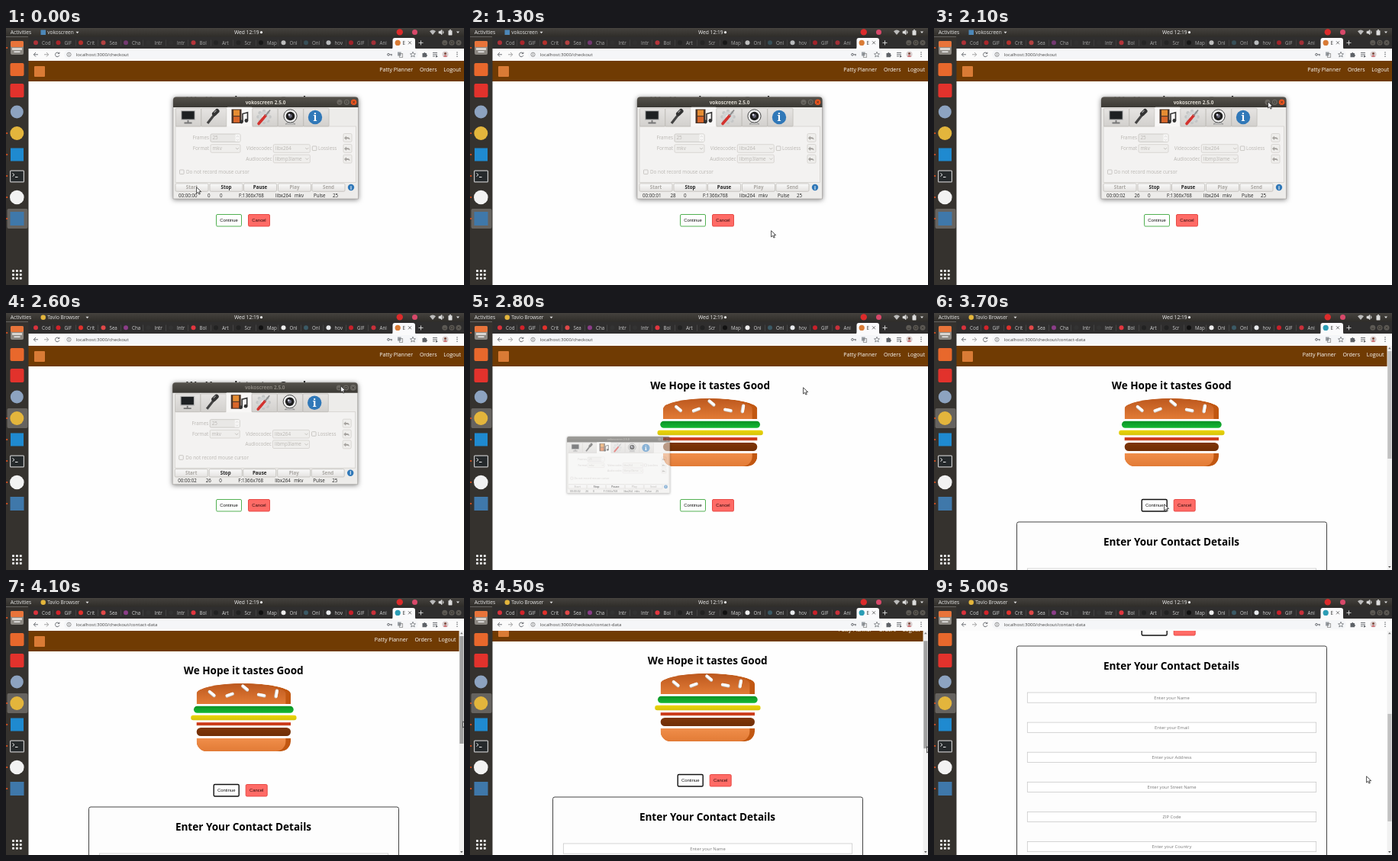
An HTML page for the animation above (5.1 s loop, 600 px wide and 337 px high).

```html
<!DOCTYPE html>
<html lang="en">
<head>
<meta charset="utf-8">
<title>Checkout screencast</title>
<style>
html, body { margin: 0; width: 100%; height: 100%; overflow: hidden; background: #fff; }
svg { display: block; width: 100vw; height: 100vh; font-family: "Open Sans", "Noto Sans", sans-serif; }
.shadow { filter: drop-shadow(0 1px 3px rgba(0, 0, 0, .5)); }
</style>
</head>
<body>
<svg id="stage" viewBox="0 0 600 337"></svg>
<script>
const LOOP = 5100, STEP = 100;
const MINIMIZE = 2600, SUBMIT = 3600;

const rect = (x, y, w, h, fill, more = '') =>
  `<rect x="${x}" y="${y}" width="${w}" height="${h}" fill="${fill}" ${more}/>`;
const circle = (x, y, r, fill, more = '') =>
  `<circle cx="${x}" cy="${y}" r="${r}" fill="${fill}" ${more}/>`;
const path = (d, stroke, width = 1, fill = 'none', more = '') =>
  `<path d="${d}" stroke="${stroke}" stroke-width="${width}" fill="${fill}" ${more}/>`;
const text = (x, y, size, fill, str, more = '') =>
  `<text x="${x}" y="${y}" font-size="${size}" fill="${fill}" ${more}>${str}</text>`;
const group = (id, body, more = '') => `<g id="${id}" ${more}>${body}</g>`;
const gradient = (id, a, b) =>
  `<linearGradient id="${id}" x2="0" y2="1"><stop stop-color="${a}"/><stop offset="1" stop-color="${b}"/></linearGradient>`;
const MID = 'text-anchor="middle"', END = 'text-anchor="end"', BOLD = 'font-weight="700"';
const ARIAL = 'font-family="Liberation Sans, Arial, sans-serif"';

const TOP_BUN = 'M253 139V125.5A61.5 13.5 0 0 1 376.3 125.5V139Z';
const LOW_BUN = 'M253 184H376.3V188A13 13 0 0 1 363.3 201H266A13 13 0 0 1 253 188Z';

const defs = `<defs>
  ${gradient('bunTop', '#bc581e', '#e27b36')}${gradient('bunLow', '#f08e4a', '#e27b36')}
  ${gradient('salad', '#0c9226', '#15b834')}${gradient('cheese', '#ecd404', '#d6c40c')}
  ${gradient('bacon', '#cb2c0e', '#cc4a24')}${gradient('meat', '#7f3608', '#702e05')}
  ${gradient('tab', '#e6e4e2', '#d2d0cd')}${gradient('key', '#fafafa', '#e4e2e0')}
  ${gradient('panel', '#45423e', '#2f2d29')}${gradient('caption-bar', '#55524c', '#3b3934')}
  <clipPath id="page"><rect x="29" y="43" width="571" height="294"/></clipPath>
  <clipPath id="topClip"><path d="${TOP_BUN}"/></clipPath>
  <clipPath id="lowClip"><path d="${LOW_BUN}"/></clipPath>
</defs>`;

function bun(d, fill, clip) {
  return `<g clip-path="url(#${clip})">${path(d, 'none', 0, '#c15711')}` +
    path(d, 'none', 0, `url(#${fill})`, 'transform="translate(-6.6 0)"') + '</g>';
}

function burger() {
  const seeds = [[273, 125.5, 40], [296.5, 127, -20], [316.5, 118, 40], [338, 127.5, 10], [357.5, 125.5, 100]];
  return bun(TOP_BUN, 'bunTop', 'topClip') +
    seeds.map(([x, y, a]) => `<g transform="translate(${x} ${y}) rotate(${a})">` +
      rect(-6, -2.1, 12, 4.4, '#c9c9c9', 'rx="2.2"') + rect(-5.7, -2, 11, 3.3, '#fff', 'rx="1.7"') + '</g>').join('') +
    rect(249.3, 141.8, 130.7, 9, 'url(#salad)', 'rx="4.5"') +
    rect(245.5, 153.8, 138.4, 6.4, 'url(#cheese)', 'rx="3.2"') +
    rect(253, 163.2, 123.3, 4, 'url(#bacon)') +
    rect(253, 170, 123.3, 11, 'url(#meat)', 'rx="5.5"') +
    bun(LOW_BUN, 'bunLow', 'lowClip');
}

function button(id, x, w, label) {
  return group(id, rect(x, 244.5, w, 15.5, '#fff', 'rx="1.5"') +
    text(x + w / 2, 254.2, 5.9, '#111', label, `${MID} ${ARIAL}`));
}

function form() {
  const fields = ['Name', 'Email', 'Address', 'Street Name', 'ZIP Code', 'Country'];
  return rect(108.9, 274.9, 406, 300, '#bbb', 'rx="3"') +
    rect(108.5, 274, 406, 300, '#fdfdfd', 'rx="2.5" stroke="#444" stroke-width="1"') +
    text(311, 304.8, 13.55, '#000', 'Enter Your Contact Details', `${MID} ${BOLD}`) +
    fields.map((f, i) => {
      const y = 335 + i * 39.1;
      return rect(122.3, y, 378.4, 13.2, '#fff', 'stroke="#c4c4c4" stroke-width=".7"') +
        text(311.5, y + 8.6, 5.85, '#777', f === 'ZIP Code' ? f : 'Enter your ' + f, MID);
    }).join('');
}

function page() {
  const links = [[533, 'Patty Planner'], [564.5, 'Orders'], [596, 'Logout']];
  return `<g clip-path="url(#page)">` + rect(29, 42, 571, 295, '#fefefe') +
    group('scroll',
      rect(29, 42, 571, 28, '#703b03') + rect(37, 50, 14, 14, '#d97b35', 'rx="1"') +
      group('links', links.map(([x, s]) => text(x, 57, 7, '#fff', s, END)).join('')) +
      group('order', text(314.6, 99.8, 13.55, '#000', 'We Hope it tastes Good', `${MID} ${BOLD}`) +
        burger() + button('ok', 275.5, 33, 'Continue') + button('cancel', 317.5, 28, 'Cancel')) +
      group('form', form())) +
    group('bar', rect(593.5, 42, 6.5, 295, '#f1f1f1') +
      path('M595 47.3L596.8 45L598.6 47.3Z', 'none', 0, '#777') +
      path('M595 332L596.8 334.3L598.6 332Z', 'none', 0, '#555') +
      rect(594.3, 50, 5.2, 141, '#c1c1c1', 'id="thumb"')) + '</g>';
}

function browser() {
  const tabs = [['Cod', '#d8323c'], ['GIF', '#d2232a'], ['Crit', '#e0312c'], ['Sea', '#e04848'], ['Cha', '#8b3d88'],
    ['Intr', '#333'], ['Intr', '#333'], ['Bol', '#e2363f'], ['Art', '#222'], ['Scr', '#222'], ['Map', '#111'],
    ['Onl', '#eee'], ['Onl', '#3b5a66'], ['hov', '#e8eaed'], ['GIF', '#c8202a'], ['Ani', '#c8303a']];
  const line = (d) => path(d, '#5f6368', .9);
  return rect(29, 11, 571, 17, '#2f2e2e') +
    group('tabText', tabs.map(([s, c], i) => {
      const x = 39 + i * 29.5;
      return circle(x, 19.2, 3, c) + text(x + 8, 21.5, 6.2, '#d0d0d0', s) +
        (i ? rect(x - 7, 15.5, .5, 8, '#5a5a5a') : '');
    }).join('')) +
    path('M504 28Q506.5 28 506.5 25V16Q506.5 13 509.5 13H533Q536 13 536 16V25Q536 28 538.5 28Z', 'none', 0, '#fafafb') +
    circle(513.2, 19.4, 3.6, '#d97b35', 'id="favicon"') +
    text(519.5, 21.6, 6.2, '#333', 'E') + path('M527 17.3L531 21.3M531 17.3L527 21.3', '#555', .8) +
    path('M540.5 19.4H546.5M543.5 16.4V22.4', '#ddd', .9) +
    [574.8, 584, 593].map(x => circle(x, 19.2, 3.5, '#5d5a55')).join('') +
    path('M573.2 20.2H576.4M582.5 17.8H585.5V20.7H582.5ZM591.6 17.8L594.4 20.6M594.4 17.8L591.6 20.6', '#2e2b28', .7) +
    rect(29, 27, 571, 16, '#fbfbfb') + rect(76, 28.7, 464, 12, '#f5f6f8', 'rx="6"') +
    line('M42 34.8H36.5M39 32L36.3 34.8L39 37.6') +
    path('M50 34.8H55.5M53 32L55.7 34.8L53 37.6', '#999', .9) +
    line('M69.3 33A2.8 2.8 0 1 0 69.9 35.8M69.9 31.7V33.6H67.8') +
    circle(82.5, 34.8, 2.6, 'none', 'stroke="#666" stroke-width=".7"') + path('M82.5 34.3V36.3M82.5 33V33.7', '#666', .7) +
    text(91.8, 37, 6.1, '#444', '', 'id="url"') +
    circle(501, 34.8, 1.4, 'none', 'stroke="#5f6368" stroke-width=".9"') + line('M502.4 34.8H506M505 34.8V36.5') +
    rect(513, 31.5, 4.6, 5, '#9aa0a6') + rect(515.3, 33.7, 4.4, 4.6, 'none', 'stroke="#777" stroke-width=".7"') +
    path('M533 31.3L534 33.7L536.5 33.9L534.6 35.5L535.2 38L533 36.6L530.8 38L531.4 35.5L529.5 33.9L532 33.7Z', '#5f6368', .7) +
    path('M545.5 33H547.3A1 1 0 0 1 549.3 33H551V35A1 1 0 0 1 551 37V38.3H545.5Z', 'none', 0, '#5f6368') +
    line('M559 32.5H565M559 34.8H565M559 37H562') + path('M563 35.6L566 37.2L563 38.8Z', 'none', 0, '#5f6368') +
    circle(575.5, 34.6, 4, '#d9cfd0') + circle(575.5, 33.4, 1.5, '#7a4a3c') + path('M572.8 37.5Q575.5 33.8 578.2 37.5Z', 'none', 0, '#c9474c') +
    [32, 34.6, 37.2].map(y => circle(591, y, .75, '#5f6368')).join('');
}

function desktop() {
  const grid = [0, 1, 2].flatMap(i => [0, 1, 2].map(j => rect(8 + i * 4.9, 317 + j * 4.9, 3, 3, '#e8e8e8', 'rx=".8"')));
  return rect(0, 0, 600, 11.5, 'url(#panel)') +
    text(5.8, 8.2, 6.7, '#e6e6e6', 'Activities') +
    rect(45.5, 2.5, 6.5, 6.5, '#4d87b8', 'id="appIcon"') + text(54.3, 8.2, 6.5, '#e6e6e6', '', 'id="appName"') +
    path('M0 0H4L2 2.4Z', 'none', 0, '#ddd', 'id="appCaret"') +
    text(315.3, 8.2, 6.7, '#f0f0f0', 'Wed 12:19', MID) + circle(334.5, 5.7, 1.6, '#eee') +
    circle(515.8, 5.4, 4.2, '#dc2b2b') + circle(535.5, 5.4, 3.5, '#d8486a') +
    path('M555 4.2Q559 1 563 4.2L559 9Z', 'none', 0, '#bbb') +
    path('M567 4.3H569L571 2.4V8.8L569 7H567ZM572.3 3.6Q574 5.6 572.3 7.6', '#ddd', .7, '#ddd') +
    rect(579.5, 3.2, 5, 6.2, '#ddd', 'rx=".6"') + rect(581, 2.1, 2, 1.2, '#ddd') +
    path('M590 4.5H594L592 7Z', 'none', 0, '#ddd') +
    rect(0, 11.5, 29.5, 326, '#35322e') +
    rect(1.5, 237, 27, 26, '#66635f', 'rx="2" id="active"') +
    // dock icons
    rect(6, 17, 17, 18, '#8c8882', 'rx="2"') + rect(6, 17, 17, 8, '#e8743a', 'rx="2"') + rect(8, 26, 13, 3, '#d8d5d0') +
    rect(10.5, 30.5, 8, 1.5, '#eee') +
    rect(5.5, 46, 18, 17, '#e8682c', 'rx="2"') + rect(5.5, 73, 18, 18, '#e2322c', 'rx="2"') +
    circle(14.3, 110, 8.5, '#8da3c0') + circle(14.3, 138, 9, '#e3b53c') + rect(6, 157.5, 17, 17, '#1f8ad0') +
    rect(5, 186.5, 19, 16, '#c8c8c8', 'rx="1.5"') + rect(6.2, 187.7, 16.6, 13.6, '#25292b') +
    path('M8.5 190.5L11 192.5L8.5 194.5M12 195.5H15.5', '#fff', .9) +
    circle(14.3, 222, 9.3, '#f2f2f2') + rect(5.5, 241, 18, 18, '#3f78aa') +
    [26, 138, 166, 194, 222, 250].map(y => circle(1.2, y, 1.1, '#e95420')).join('') + grid.join('');
}

function recorderIcons() {
  const teeth = Array.from({ length: 8 }, (_, i) => {
    const a = i * Math.PI / 4;
    return circle(338 + 7.6 * Math.cos(a), 116.5 + 7.6 * Math.sin(a), 2.2, '#c4c6c6');
  });
  return rect(229, 108, 19, 13, '#bbb', 'rx="1"') + rect(230.3, 109.2, 16.4, 10.4, '#1d2022') +
    path('M233.5 124.5H243.5M238.5 121V124', '#777', 1.8) +
    path('M264 125L273 113.5', '#444', 3.2) + path('M273 112.5L276.5 109', '#333', 6, 'none', 'stroke-linecap="round"') +
    path('M272.5 111L275.5 108', '#999', 1.2) +
    rect(295.5, 106.5, 13, 18.5, '#4a3428') + rect(298, 107.5, 8, 7.6, '#e58c32') + rect(298, 116.2, 8, 7.6, '#d9662a') +
    path('M310 123V112.5L316.5 110.8V121.3', '#333', 1.6) + circle(308.4, 123, 2.4, '#333') + circle(314.9, 121.5, 2.4, '#333') +
    teeth.join('') + circle(338, 116.5, 7, '#d2d4d4') + circle(338, 116.5, 2.6, '#f2f2f2') +
    path('M331 125.5L340 115', '#d3322e', 3.6, 'none', 'stroke-linecap="round"') + path('M340 115L346 107.5', '#8a8a8a', 1.8) +
    path('M366 126Q372.5 121 379 126Z', '#777', .6, '#ddd') +
    circle(372.5, 115.5, 8.6, '#f0f0f0', 'stroke="#444" stroke-width="1"') + circle(372.5, 115.5, 5.8, '#1e1e1e') +
    circle(372.5, 115.5, 2.4, '#667') + circle(371, 113.8, 1.3, '#dde') +
    circle(405, 117, 9.2, '#3078b8') + text(405, 122, 14, '#fff', 'i', `${MID} ${BOLD} font-family="Noto Serif, serif"`);
}

function recorder() {
  const gray = '#b9b6b2', edge = 'stroke="#cfccc8" stroke-width=".7"';
  const label = (x, y, s, more = '') => text(x, y, 6.3, gray, s, more);
  const combo = (x, y, w, s) => rect(x, y, w, 10.6, '#efeeec', `rx="1.5" ${edge}`) + label(x + 2.5, y + 7.5, s) +
    path(`M${x + w - 6} ${y + 4.4}l2 2l2-2`, gray, .8);
  const check = (x, y) => rect(x, y, 5.6, 5.6, '#f2f1f0', `rx=".8" stroke="${gray}" stroke-width=".7"`);
  const reset = (y) => rect(442, y, 11, 10.8, '#efeeec', `rx="1.5" ${edge}`) +
    path(`M450.5 ${y + 8}q0-3.2-3-3.2h-1.5v-1.8l-3 2.8l3 2.8v-1.8h1.5q1.5 0 3 1.2`, 'none', 0, '#a5a29e');
  const keys = [[222, 'Start'], [267, 'Stop', 1], [311.5, 'Pause', 1], [356.5, 'Play'], [401, 'Send']];
  const status = [[226, '', 'clock'], [262.5, '', 'fps'], [280, '0'], [305, 'F:1366x768'], [353, 'libx264'],
    [378, 'mkv'], [403, 'Pulse'], [428, '25']];
  return path('M219 224V94.5Q219 90.5 223 90.5H457.5Q461.5 90.5 461.5 94.5V224Z', '#9b9894', .6, '#edecea', 'class="shadow"') +
    path('M219 104V94.5Q219 90.5 223 90.5H457.5Q461.5 90.5 461.5 94.5V104Z', 'none', 0, 'url(#caption-bar)') +
    text(340, 99.7, 6.4, '#dfdbd2', 'vokoscreen 2.5.0', `${MID} ${BOLD} id="caption"`) +
    circle(437, 97.2, 3.5, '#6b6862') + circle(446.3, 97.2, 3.5, '#6b6862') + circle(455.6, 97.2, 3.8, '#e9541f', 'id="close"') +
    path('M435.4 98.2H438.6M444.8 95.8H447.8V98.7H444.8ZM454.2 95.8L457 98.6M457 95.8L454.2 98.6', '#2e2b28', .7) +
    rect(222, 129, 236.5, 73.5, '#f3f2f1', edge) +
    [0, 1, 2, 3, 4, 5].map(i => rect(222.3 + i * 33.5, i === 2 ? 103.7 : 105.3, 33.3, i === 2 ? 26 : 23.7,
      i === 2 ? '#f8f7f6' : 'url(#tab)', `rx="1" ${i === 2 ? '' : 'stroke="#b5b2ae" stroke-width=".6"'}`)).join('') +
    recorderIcons() +
    label(266, 146.4, 'Frames', END) + rect(268, 139, 39, 10.4, '#e9e8e6', 'rx="1.5" stroke="#c0bdb9" stroke-width=".7"') +
    label(270.5, 146.4, '25') + rect(300.5, 139.4, 6, 9.6, '#f6f5f4') + path('M302 143l1.5-1.5l1.5 1.5M302 146l1.5 1.5l1.5-1.5', '#ccc', .6) +
    label(266, 160.3, 'Format', END) + combo(268, 152.7, 39, 'mkv') +
    label(348.5, 160.3, 'Videocodec', END) + combo(350.3, 152.7, 48, 'libx264') + check(401.3, 155) + label(409, 160.3, 'Lossless') +
    label(348.5, 173.8, 'Audiocodec', END) + combo(350.3, 166.2, 48, 'libmp3lame') +
    [138.5, 152.5, 166.3].map(reset).join('') + check(227.5, 186) + label(236, 191.3, 'Do not record mouse cursor') +
    keys.map(([x, s, on]) => rect(x, 204, 43, 10.3, 'url(#key)', 'rx="1.5" stroke="#bbb8b4" stroke-width=".7"') +
      text(x + 21.5, 211.4, 6.2, on ? '#222' : '#aaa7a3', s, `${MID} ${BOLD}`)).join('') +
    circle(452, 209, 4.2, '#3078b8') + text(452, 211.5, 6.5, '#fff', 'i', `${MID} ${BOLD}`) +
    status.map(([x, s, id]) => text(x, 221.6, 6.2, '#222', s, id ? `id="${id}"` : '')).join('');
}

document.getElementById('stage').innerHTML = defs + page() + browser() + desktop() + group('recorder', recorder()) +
  path('M.6 .8V9L2.6 7.2L3.9 10.1L5.3 9.5L4 6.7H6.7Z', '#222', .8, '#fff', 'id="cursor"');

const el = Object.fromEntries([...document.querySelectorAll('[id]')].map(e => [e.id, e]));
const set = (e, attrs) => { for (const k in attrs) e.setAttribute(k, attrs[k]); };
const show = (e, on) => set(e, { visibility: on ? 'visible' : 'hidden' });

const POINTER = [[0, 249, 208], [200, 250, 209], [600, 330, 245], [1000, 385, 260], [1300, 394, 265], [1400, 393, 268],
  [1800, 430, 102], [2100, 437, 96], [2600, 438, 95], [2800, 436, 97], [3000, 404, 140], [3200, 322, 245],
  [3500, 300, 250], [3700, 301, 250], [4000, 590, 170], [4100, 598, 161], [4400, 598, 189], [4500, 598, 194],
  [4700, 598, 288], [4800, 598, 283], [5000, 566, 233]];
const SCROLL = [[0, 0], [4400, 0], [4500, 13], [4700, 211]];

// Linear interpolation in a table of [time, ...values]
function sample(keys, t) {
  const i = keys.findIndex(k => k[0] > t);
  if (i < 0) return keys[keys.length - 1].slice(1);
  const a = keys[i - 1], b = keys[i], p = (t - a[0]) / (b[0] - a[0]);
  return a.slice(1).map((v, n) => v + (b[n + 1] - v) * p);
}

function paintButton(e, fill, stroke, ink, width = 1) {
  set(e.firstChild, { fill, stroke, 'stroke-width': width });
  set(e.lastChild, { fill: ink });
}

function render(t) {
  const [x, y] = sample(POINTER, t), [scroll] = sample(SCROLL, t);
  const focused = t >= MINIMIZE, sent = t >= SUBMIT;
  const over = (left, right) => t > 2900 && x > left && x < right && y > 244 && y < 260;

  set(el.cursor, { transform: `translate(${x} ${y})` });
  set(el.scroll, { transform: `translate(0 ${-scroll})` });
  set(el.order, { transform: `translate(${sent ? -3.3 : 0} 0)` });
  set(el.links, { transform: `translate(${sent ? -6.5 : 0} 0)` });
  set(el.thumb, { y: 50 + scroll * .483, fill: x > 593 ? '#a0a0a0' : '#c1c1c1' });
  show(el.form, sent);
  show(el.bar, sent);
  set(el.favicon, { fill: sent ? '#2b9db5' : '#d97b35' });
  el.url.textContent = 'localhost:3000/checkout' + (sent ? '/contact-data' : '');

  if (sent) paintButton(el.ok, '#fff', '#111', '#111', 1.4);
  else if (over(275, 309)) paintButton(el.ok, '#2ca02c', '#2ca02c', '#fff');
  else paintButton(el.ok, '#fff', '#3fa83f', '#111', .9);
  if (!sent && over(317, 346)) paintButton(el.cancel, '#ff6f69', '#ff8a85', '#ffd5d2', .5);
  else paintButton(el.cancel, '#ff6b66', '#e5403a', '#2a0a0a', .9);

  el.appName.textContent = focused ? 'Tavlo Browser' : 'vokoscreen';
  set(el.appCaret, { transform: `translate(${focused ? 104.5 : 91.5} 4.8)` });
  set(el.appIcon, { fill: focused ? '#e3b53c' : '#4d87b8', rx: focused ? 3.2 : 0 });
  set(el.active, { y: focused ? 125 : 237 });
  set(el.tabText, { opacity: focused ? 1 : .75 });

  el.clock.textContent = '00:00:0' + Math.min(2, Math.floor(t / 1000));
  el.fps.textContent = t < 1000 ? '0' : t < 2000 ? '28' : '26';
  set(el.fps, { x: t < 1000 ? 264 : 262.5 });
  set(el.caption, { fill: focused ? '#8a867f' : '#dfdbd2' });
  set(el.close, { fill: focused ? '#6b6862' : '#e9541f' });
  const p = Math.max(0, t - MINIMIZE) / 300, k = 1 - p * p;
  show(el.recorder, p < 1);
  set(el.recorder, {
    transform: focused ? `translate(${14 * (1 - k) - .8} ${250 * (1 - k) + .7}) scale(${k})` : '',
    opacity: k
  });
}

const start = performance.now();
function tick(now) {
  const t = Math.max(0, now - start) % LOOP;
  render(Math.floor(t / STEP) * STEP);
  requestAnimationFrame(tick);
}
render(0);
requestAnimationFrame(tick);
</script>
</body>
</html>
```
